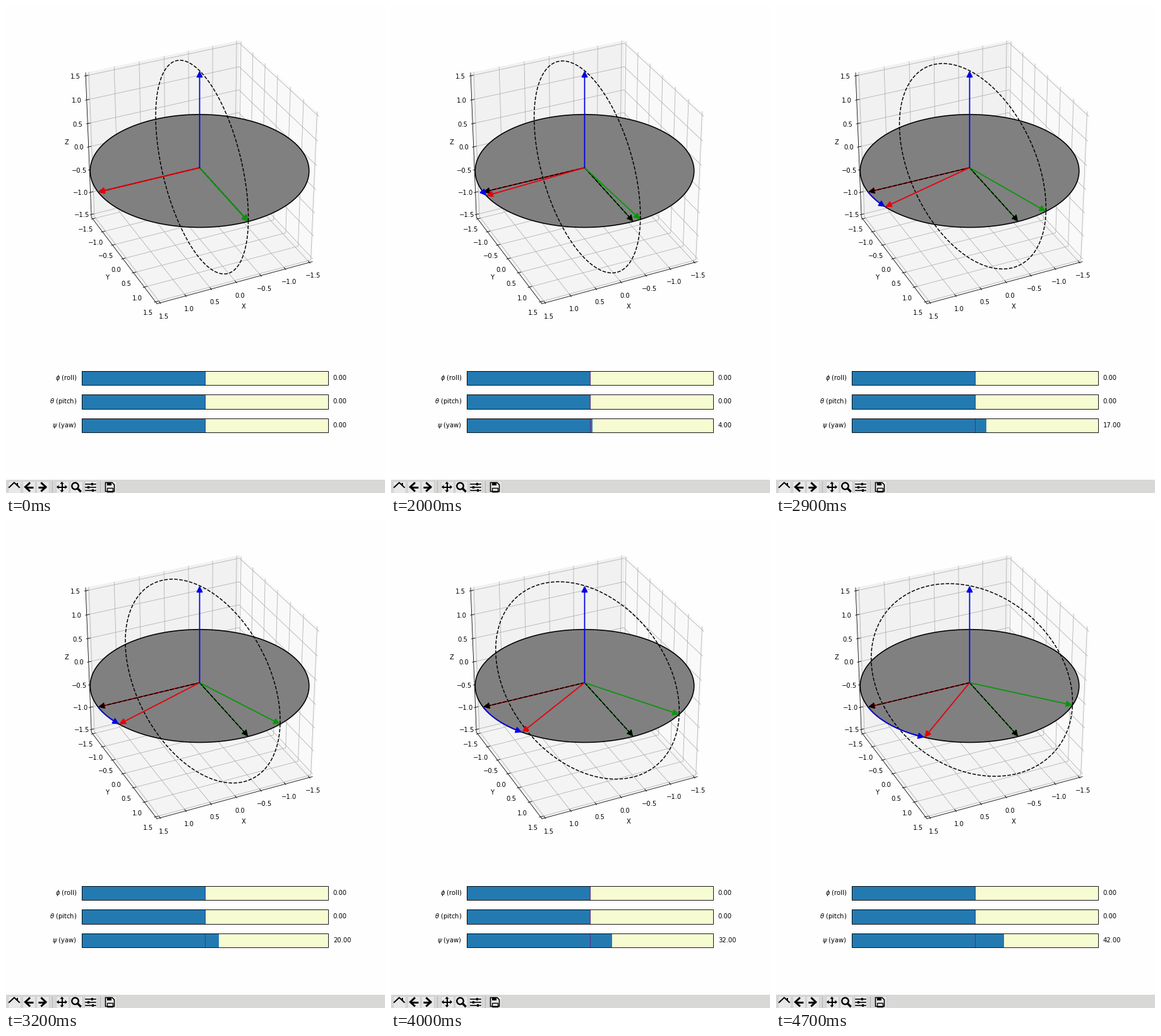
A matplotlib script for the animation above (8000 ms loop, 600 px wide and 771 px high).

```python
import numpy as np
import matplotlib.pyplot as plt
from matplotlib.animation import FuncAnimation
from matplotlib.patches import Circle, FancyArrowPatch, Polygon, Rectangle

WIDTH, HEIGHT, DPI = 600, 771, 96
PT = 72 / DPI  # points per pixel
INK = "black"
RED, GREEN, BLUE = "#e6000a", "#0a960a", "#0000e6"

plt.rcParams["font.family"] = "DejaVu Sans"
fig = plt.figure(figsize=(WIDTH / DPI, HEIGHT / DPI), dpi=DPI, facecolor="#fefefe")
ax = fig.add_axes([0, 0, 1, 1])
ax.set_xlim(0, WIDTH)
ax.set_ylim(HEIGHT, 0)
ax.axis("off")

# Perspective camera looking at the middle of the cube
AZIM, ELEV = np.radians([65, 31])
DIST, SCALE, CENTER = 10, 2594.6, (306.5, 256.0)
RIGHT = np.array([-np.sin(AZIM), np.cos(AZIM), 0])
UP = np.array([-np.sin(ELEV) * np.cos(AZIM), -np.sin(ELEV) * np.sin(AZIM), np.cos(ELEV)])
TOWARD = np.array([np.cos(ELEV) * np.cos(AZIM), np.cos(ELEV) * np.sin(AZIM), np.sin(ELEV)])

EDGE = 1.5625
RADIUS = 2
TICKS = np.arange(-1.5, 1.6, 0.5)


def project(points):
    p = np.asarray(points, float) / 3
    k = SCALE / (DIST - p @ TOWARD)
    return np.stack([CENTER[0] + k * (p @ RIGHT), CENTER[1] - k * (p @ UP)], axis=-1)


def stroke(points, color=INK, width=0.8, z=2, **style):
    x, y = np.transpose(points)
    return ax.plot(x, y, color=color, lw=width * PT, zorder=z, **style)[0]


def fill(points, color, z=1, edge="none", width=0.0):
    return ax.add_patch(Polygon(points, fc=color, ec=edge, lw=width * PT, zorder=z))


def box(x, y, w, h, color, z=1, edge="none", width=0.0):
    return ax.add_patch(Rectangle((x, y), w, h, fc=color, ec=edge, lw=width * PT, zorder=z))


def write(x, y, text, ha="center", va="baseline"):
    return ax.text(x, y, text, ha=ha, va=va, fontsize=10 * PT, zorder=2.5)


def arrow(color, start, end, width=1.8, z=5, style="-"):
    patch = FancyArrowPatch(start, end, arrowstyle="-|>", mutation_scale=20 * PT,
                            shrinkA=0, shrinkB=0, color=color, lw=width * PT,
                            linestyle=style, zorder=z)
    return ax.add_patch(patch)


def on_disc(angle):
    angle = np.asarray(angle, float)
    return RADIUS * np.stack([np.cos(angle), np.sin(angle), 0 * angle], axis=-1)


def draw_cube():
    e = EDGE
    fill(project([(-e, -e, -e), (-e, e, -e), (-e, e, e), (-e, -e, e)]), "#f9f9f9")
    fill(project([(-e, -e, -e), (e, -e, -e), (e, -e, e), (-e, -e, e)]), "#f1f1f1")
    fill(project([(-e, -e, -e), (e, -e, -e), (e, e, -e), (-e, e, -e)]), "#f4f4f4")
    for t in TICKS:
        for line in ([(t, e, -e), (t, -e, -e), (t, -e, e)],
                     [(e, t, -e), (-e, t, -e), (-e, t, e)],
                     [(e, -e, t), (-e, -e, t), (-e, e, t)]):
            stroke(project(line), "#b0b0b0", z=1.5)
    out, inn, pad = e + 0.025, e - 0.05, e + 0.144
    for t in TICKS:
        marks = ([(t, out, -e), (t, inn, -e)],
                 [(out, t, -e), (inn, t, -e)],
                 [(out, -e, t), (inn, -e, t)])
        spots = ((t, pad, -pad), (pad, t, -pad), (pad, -pad, t))
        for mark, spot in zip(marks, spots):
            stroke(project(mark))
            x, y = project(spot)
            write(x, y + 7.3, f"{t:.1f}".replace("-", "\u2212"))
    for line in ([(e, e, -e), (-e, e, -e)], [(e, -e, -e), (e, e, -e)], [(e, -e, -e), (e, -e, e)]):
        stroke(project(line))
    for name, x, y in (("X", 376.5, 479), ("Y", 160.5, 433), ("Z", 96, 219)):
        write(x, y, name)


def draw_slider(y, label):
    box(120, y, 390, 22.5, "#f7fbd2", 1)
    bar = box(120, y, 195, 22.5, "#237ab1", 1.2)
    stroke([(315.4, y), (315.4, y + 22.5)], "#5b2c83", 1, 1.4)
    box(120, y, 390, 22.5, "none", 2, INK, 0.9)
    write(112.2, y + 11.2, label, "right", "center")
    return bar, write(517.8, y + 14.4, "0.00", "left")


def draw_toolbar():
    box(0, 750, WIDTH, 21, "#d8d8d7")
    for x in (13, 36, 57.5, 88.5, 111, 133.5, 164.5):
        box(x - 10, 751.5, 20, 19, "#e8e8e8", 1.2, "#c6c6c6", 0.8)
    for x in (73, 149):
        stroke([(x, 752), (x, 770)], "#b4b4b4", 1)

    # Home
    stroke([(5, 762), (13, 754.5), (21, 762)], width=2)
    fill([(7.5, 762.5), (13, 757.5), (18.5, 762.5), (18.5, 768.5), (14.7, 768.5),
          (14.7, 764), (11.3, 764), (11.3, 768.5), (7.5, 768.5)], INK)
    box(16.8, 754.5, 2, 4, INK, 2)
    # Back and forward
    for x, d in ((36, 1), (57.5, -1)):
        stroke([(x - 5 * d, 761.5), (x + 7 * d, 761.5)], width=3, solid_capstyle="butt")
        stroke([(x + d, 755.5), (x - 5.5 * d, 761.5), (x + d, 767.5)], width=3,
               solid_joinstyle="miter")
    # Pan
    mid = np.array([88.5, 761.5])
    for d in np.array([(1, 0), (-1, 0), (0, 1), (0, -1)]):
        side = d[::-1] * 3.2
        stroke([mid, mid + 6 * d], width=2)
        fill([mid + 8.5 * d, mid + 5 * d + side, mid + 5 * d - side], INK, 2)
    # Zoom
    ax.add_patch(Circle((109.5, 760), 5.2, fc="none", ec=INK, lw=2.4 * PT, zorder=2))
    stroke([(113.5, 764), (117.5, 768)], width=3.4)
    # Settings
    for y, x in ((756.5, 136), (761.5, 130), (766.5, 137)):
        stroke([(125.5, y), (141.5, y)], width=1.6)
        box(x - 1.5, y - 2, 3, 4, INK, 2)
    # Save
    fill([(157.5, 754.5), (168, 754.5), (171.5, 758), (171.5, 768.5), (157.5, 768.5)],
         "#e8e8e8", 1.5, INK, 1.6)
    box(160, 755, 7, 4, INK, 2)
    box(160, 763, 9, 5.5, "none", 2, INK, 1.4)


draw_cube()
draw_toolbar()
draw_slider(577.5, r"$\phi$ (roll)")
draw_slider(615, r"$\theta$ (pitch)")
yaw_bar, yaw_text = draw_slider(652.5, r"$\psi$ (yaw)")

turn = np.linspace(0, 2 * np.pi, 241)
fill(project(on_disc(turn)), "#808080", 3, INK, 1.6)
ring = stroke([(0, 0), (0, 0)], width=1.5, z=4, dashes=(3.7, 1.6))

origin = project((0, 0, 0))
x_tip, y_tip = project(on_disc([0, np.pi / 2]))
for color, tip in ((RED, x_tip), (GREEN, y_tip)):
    arrow(color, origin, tip)
    arrow(INK, origin, tip, 1.6, 5.1, (0, (3.7, 1.6)))
red = arrow(RED, origin, x_tip, z=5.2)
green = arrow(GREEN, origin, y_tip, z=5.2)
arrow(BLUE, origin, project((0, 0, RADIUS)), z=5.3)
arc = stroke([x_tip, x_tip], BLUE, 1.8, 5.3, solid_capstyle="butt")
arc_head = arrow(BLUE, origin, x_tip, z=5.4)

# Yaw in degrees, set at tenths of a second, held in between
YAW_STEPS = [(0, 0), (12, 1), (17, 2), (19, 3), (20, 4), (22, 5), (23, 7), (24, 8),
             (25, 10), (26, 12), (27, 13), (28, 15), (29, 17), (30, 18), (31, 19),
             (32, 20), (34, 21), (35, 23), (36, 25), (37, 27), (38, 29), (39, 30),
             (40, 32), (42, 33), (43, 34), (45, 41), (47, 42)]


def update(frame):
    yaw = max(value for start, value in YAW_STEPS if start <= frame)
    psi = np.radians(yaw)
    red_tip, green_tip = project(on_disc([psi, psi + np.pi / 2]))
    red.set_positions(origin, red_tip)
    green.set_positions(origin, green_tip)

    upright = np.stack([-np.sin(psi) * np.cos(turn), np.cos(psi) * np.cos(turn), np.sin(turn)], -1)
    ring.set_data(*project(RADIUS * upright).T)

    arc.set_data(*project(on_disc(np.linspace(0, max(psi - 0.07, 0), 30))).T)
    arc_head.set_positions(project(on_disc(psi - 0.07)), red_tip)
    arc.set_visible(yaw >= 3)
    arc_head.set_visible(yaw >= 3)

    yaw_bar.set_width(195 + 390 * yaw / 360)
    yaw_text.set_text(f"{yaw:.2f}")
    return []


anim = FuncAnimation(fig, update, frames=80, interval=100, repeat=True, repeat_delay=0, blit=False)
plt.show()
```
